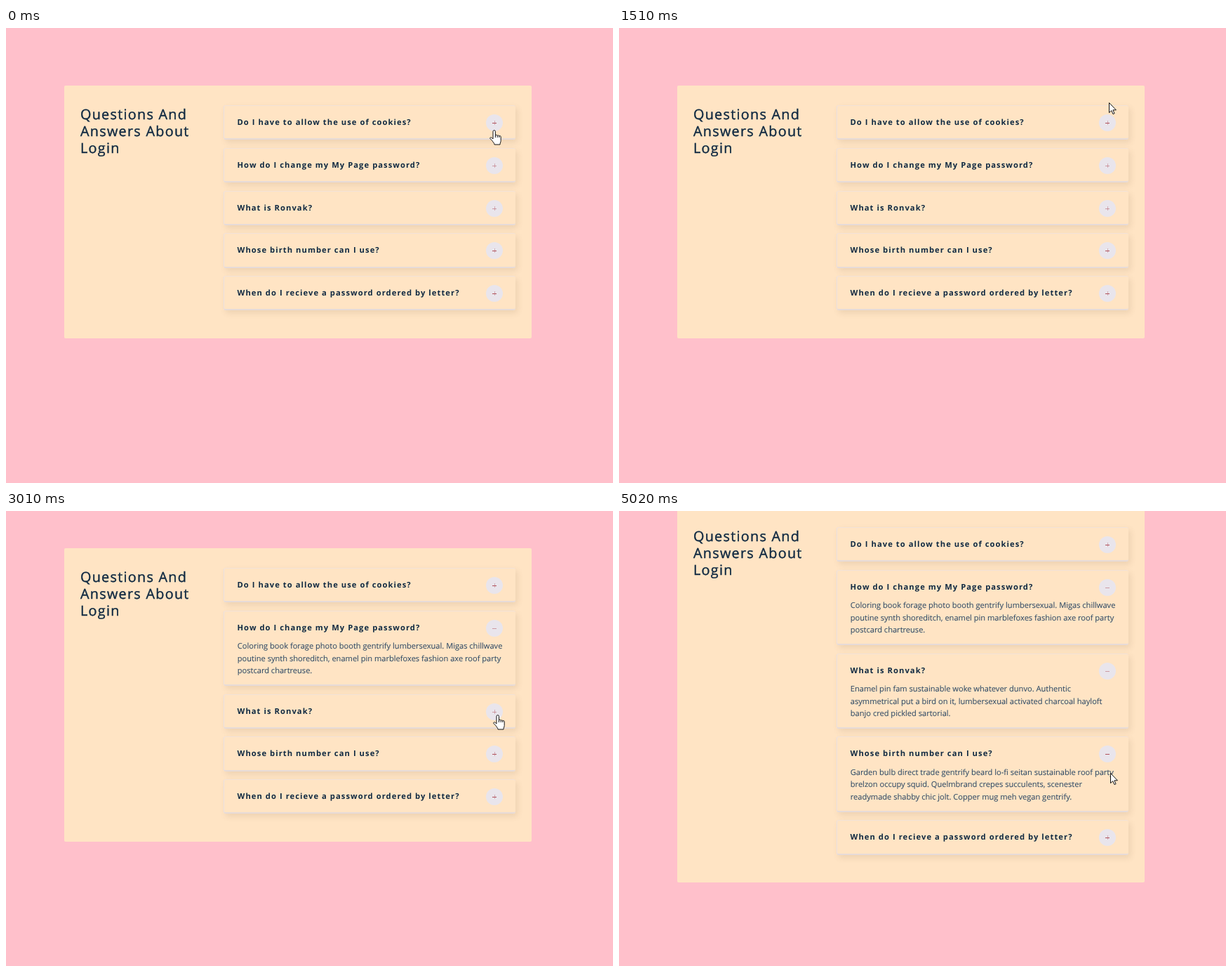
Write an HTML page that moves like this. It is 865 px wide and 648 px high and loops after 5520 ms.

```html
<!DOCTYPE html>
<html lang="en">
<head>
<meta charset="utf-8">
<title>Questions and answers</title>
<style>
  html, body { margin: 0; width: 100%; height: 100%; overflow: hidden; background: #ffc0cb; }
  body { position: relative; font-family: "Open Sans", "Noto Sans", sans-serif; text-rendering: geometricPrecision; cursor: default; }
  h1, h2, p { margin: 0; position: absolute; white-space: nowrap; }
  #card { position: absolute; left: 83px; width: 666px; background: #ffe4c4; border-radius: 2px; }
  h1 { left: 23px; top: 29.2px; font-size: 19.8px; line-height: 24.1px; font-weight: 400; letter-spacing: 1.28px; color: #102a42; -webkit-text-stroke: .4px #102a42; }
  .row {
    position: absolute; left: 227px; width: 416px; box-sizing: border-box; border-radius: 3px;
    border: 1px solid #f2e2d8; border-width: 1px 0 2px 1px; border-bottom-color: #e6dbd8; border-left-color: #eae0e0;
    box-shadow: 3px 4px 8px rgba(110, 80, 50, .12);
  }
  h2 { left: 18.5px; top: 14px; font-size: 11.2px; line-height: 20px; font-weight: 700; letter-spacing: 1.06px; color: #102a42; }
  p { left: 18.8px; top: 41.5px; font-size: 11.08px; line-height: 17.55px; color: #324d67; -webkit-text-stroke: .1px #324d67; }
  .btn { position: absolute; left: 373px; top: 12px; width: 24px; height: 24px; border-radius: 50%; background: #e9e5ec; }
  .btn::before, .btn::after { content: ""; position: absolute; background: #b0525c; }
  .btn::before { left: 9px; top: 12px; width: 6px; height: 1px; }
  .btn::after { left: 12px; top: 9px; width: 1px; height: 6px; opacity: .4; }
  .pale .btn::before { opacity: .5; }
  .pale .btn::after { opacity: .4; }
  .open .btn::after, .row:not(.open) p { display: none; }
  svg { position: absolute; left: 0; top: 0; width: 24px; height: 26px; overflow: visible; }
  svg path { fill: #fff; stroke: #111; stroke-width: 1; stroke-linejoin: round; }
  svg .bar { fill: none; }
</style>
</head>
<body>
<div id="card"><h1>Questions And<br>Answers About<br>Login</h1></div>
<svg id="pointer">
  <g id="arrow"><path d="M.5.5V14.6l3.3-3 2.2 5 2.1-.9-2.2-4.9h4.5z"/></g>
  <g id="hand">
    <path d="M5 13V2.4a1.7 1.7 0 0 1 3.4 0V8a1.6 1.6 0 0 1 2.8.4a1.5 1.5 0 0 1 2.6.6a1.4 1.4 0 0 1 2.4 1v5.5c0 2-1.2 3-1.2 5.5H7c0-2.2-2.2-3.6-3.4-5.8L1 12.6c-.8-1.5 1.2-2.6 2.2-1.2z"/>
    <path class="bar" d="M8.4 8v3M11.2 8.4V11M13.8 9v2"/>
  </g>
  <g id="beam"><path class="bar" d="M.5.5h2l1 1 1-1h2M3.5 1.5v12M.5 14.5h2l1-1 1 1h2"/></g>
</svg>
<script>
const LOOP = 5520, CLOSED = 49.3, GROWTH = 58, GAP = 11.5;

const faq = [
  ["Do I have to allow the use of cookies?",
   "Unicorn vinyl poutine brooklyn, next level direct trade iceland. Shaman",
   "copper mug church-key coloring book, whatever poutine normcore fixie",
   "cred hatchmarket post-ironic street art."],
  ["How do I change my My Page password?",
   "Coloring book forage photo booth gentrify lumbersexual. Migas chillwave",
   "poutine synth shoreditch, enamel pin marblefoxes fashion axe roof party",
   "postcard chartreuse."],
  ["What is Ronvak?",
   "Enamel pin fam sustainable woke whatever dunvo. Authentic",
   "asymmetrical put a bird on it, lumbersexual activated charcoal hayloft",
   "banjo cred pickled sartorial."],
  ["Whose birth number can I use?",
   "Garden bulb direct trade gentrify beard lo-fi seitan sustainable roof party",
   "brelzon occupy squid. Quelmbrand crepes succulents, scenester",
   "readymade shabby chic jolt. Copper mug meh vegan gentrify."],
  ["When do I recieve a password ordered by letter?"]
];

// start time, open rows, pointer shape, pointer x, y
const steps = [
  [0, [], "hand", 689, 145],
  [500, [0], "arrow", 694, 139],
  [1010, [0], "hand", 692, 106],
  [1510, [], "arrow", 698, 106],
  [2010, [], "hand", 697, 191],
  [2510, [1], "beam", 701, 187],
  [3010, [1], "hand", 694, 290],
  [3510, [1, 2], "arrow", 700, 291],
  [4520, [1, 2], "arrow", 700, 360],
  [5020, [1, 2, 3], "arrow", 700, 373]
];

const $ = id => document.getElementById(id);
const card = $("card"), pointer = $("pointer");

function add(parent, tag, html = "") {
  const el = document.createElement(tag);
  el.innerHTML = html;
  return parent.appendChild(el);
}

const rows = faq.map(([question, ...answer], i) => {
  const row = add(card, "div");
  row.className = i === 1 || i === 2 ? "row pale" : "row";
  add(row, "h2", question);
  add(row, "p", answer.join("<br>"));
  add(row, "div").className = "btn";
  return row;
});

function show([, open, shape, x, y]) {
  let top = 28.3;
  rows.forEach((row, i) => {
    const isOpen = open.includes(i);
    const height = CLOSED + (isOpen ? GROWTH : 0);
    row.classList.toggle("open", isOpen);
    row.style.top = top + "px";
    row.style.height = height + "px";
    top += height + GAP;
  });
  card.style.top = 81.7 - open.length * GROWTH / 2 + "px";
  card.style.height = 360.7 + open.length * GROWTH + "px";
  for (const id of ["arrow", "hand", "beam"]) $(id).style.display = id === shape ? "" : "none";
  pointer.style.transform = `translate(${x}px, ${y}px)`;
}

const start = performance.now();
let current;

function tick() {
  const t = (performance.now() - start) % LOOP;
  const step = steps.findLast(s => s[0] <= t);
  if (step !== current) show(current = step);
  requestAnimationFrame(tick);
}
tick();
</script>
</body>
</html>
```
